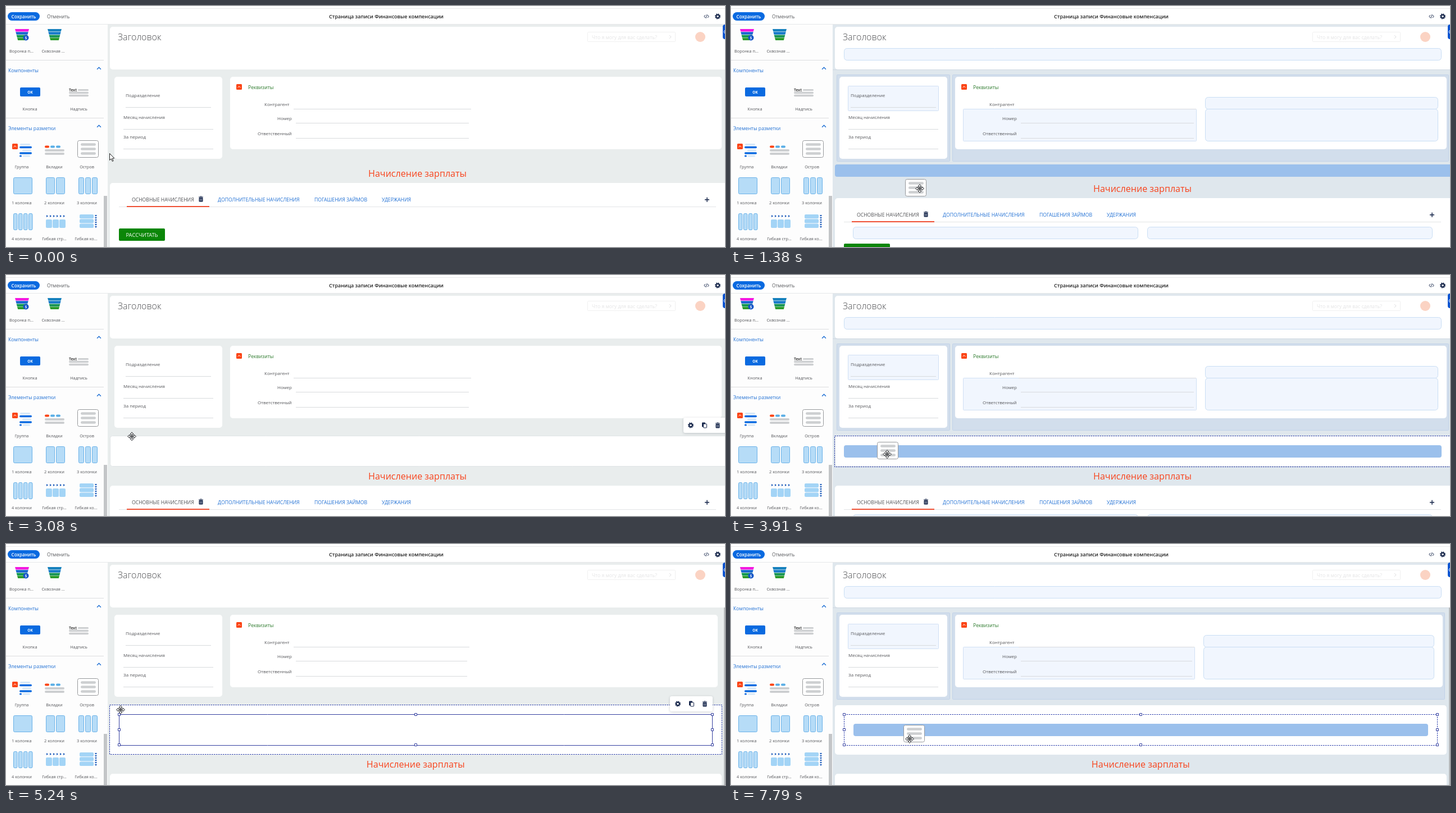
Recreate the animation shown at these times as an HTML page with a canvas. Size 1280x429 px, loop 8 s.

```html
<!DOCTYPE html>
<html lang="ru">
<head>
<meta charset="utf-8">
<title>Конструктор страницы</title>
<style>
html, body { margin: 0; width: 100%; height: 100%; overflow: hidden; background: #fff; }
canvas { display: block; width: 1280px; height: 429px; }
</style>
</head>
<body>
<canvas id="stage" width="1280" height="429"></canvas>
<script>
const c = document.getElementById('stage').getContext('2d', { alpha: false });
const LOOP = 8000, STEP = 77;
const BLUE = '#0a6ae0', LINK = '#2070d4', NAVY = '#3540a0', INK = '#16264a', RED = '#fb4415', GREY = '#cdcfd1';

// Pointer path: time, x, y
const PATH = [
  [60, 184, 262], [380, 152, 256], [600, 152, 256], [847, 305, 311], [1380, 336, 325],
  [2650, 336, 325], [3380, 146, 261], [3600, 146, 261], [3900, 278, 319],
  [4820, 278, 319], [5236, 204, 295], [5630, 161, 267], [5700, 159, 267],
  [5930, 157, 267], [6130, 157, 267], [6390, 138, 264], [7000, 138, 264],
  [7315, 235, 319], [7755, 318, 347]
];
// Each drag: grab, zones appear, drop, grab point inside the tile
const DRAGS = [
  { grab: 610, open: 760, drop: 1990, dx: 25, dy: 17 },
  { grab: 3620, open: 3760, drop: 4460, dx: 18, dy: 22 },
  { grab: 7010, open: 7400, drop: 8000, dx: 11, dy: 25 }
];
const TITLE_Y = [298, 325, 358, 358, 392, 392];

function pointer(t) {
  let a = PATH[0];
  if (t <= a[0]) return { x: a[1], y: a[2] };
  for (const b of PATH) {
    if (t < b[0]) {
      const k = (t - a[0]) / (b[0] - a[0]);
      return { x: a[1] + (b[1] - a[1]) * k, y: a[2] + (b[2] - a[2]) * k };
    }
    a = b;
  }
  return { x: a[1], y: a[2] };
}

const inside = (p, l, t, r, b) => p.x >= l && p.x <= r && p.y >= t && p.y <= b;

function fill(color, l, t, r, b) {
  c.fillStyle = color;
  c.fillRect(l, t, r - l, b - t);
}

function box(l, t, r, b, rad, color, edge) {
  c.beginPath();
  if (edge) c.roundRect(l + .5, t + .5, r - l - 1, b - t - 1, rad);
  else c.roundRect(l, t, r - l, b - t, rad);
  if (color) { c.fillStyle = color; c.fill(); }
  if (edge) { c.strokeStyle = edge; c.lineWidth = 1; c.stroke(); }
}

function text(s, x, y, size, color = '#55565a', align = 'left', weight = 400) {
  c.font = `${weight} ${size}px "Open Sans", "Noto Sans", sans-serif`;
  c.textAlign = align;
  c.textBaseline = 'alphabetic';
  c.fillStyle = color;
  c.fillText(s, x, y + size * .36 + .4);
}

function poly(points, color, edge, width = 1, close = true) {
  c.beginPath();
  points.forEach(([x, y], i) => i ? c.lineTo(x, y) : c.moveTo(x, y));
  if (close) c.closePath();
  if (color) { c.fillStyle = color; c.fill(); }
  if (edge) { c.strokeStyle = edge; c.lineWidth = width; c.stroke(); }
}

function disc(x, y, r, color) {
  c.beginPath();
  c.arc(x, y, r, 0, 7);
  c.fillStyle = color;
  c.fill();
}

const bar = (l, y, r, color = GREY, h = 4) => box(l, y - h / 2, r, y + h / 2, h / 2, color);
const chevron = (x, y, r, color, w) => poly([[x - r, y + r / 2], [x, y - r / 2], [x + r, y + r / 2]], null, color, w, false);
const zone = (l, t, r, b) => box(l, t, r, b, 5, '#f1f6fe', '#c9def4');
const area = (l, t, r, b) => box(l, t, r, b, 1, '#d2deec', '#c1d2e8');

function dashed(l, t, r, b) {
  c.setLineDash([2.5, 1.5]);
  box(l, t, r, b, 0, null, '#2639a8');
  c.setLineDash([]);
}

function collapse(x, y) {
  box(x - 5, y - 5, x + 5, y + 5, 1.5, RED);
  chevron(x, y, 2.4, '#fff', 1);
}

function gear(x, y) {
  c.strokeStyle = INK;
  c.lineWidth = 2;
  c.beginPath(); c.arc(x, y, 2.8, 0, 7); c.stroke();
  c.setLineDash([1.9, 1.4]);
  c.lineWidth = 1.6;
  c.beginPath(); c.arc(x, y, 4.2, 0, 7); c.stroke();
  c.setLineDash([]);
}

function trash(x, y) {
  box(x - 3.5, y - 2.5, x + 3.5, y + 5, 1, INK);
  fill(INK, x - 4, y - 4, x + 4, y - 3);
  fill(INK, x - 1.5, y - 5, x + 1.5, y - 4);
  fill('#b4bac7', x - 1.8, y - 1, x - .7, y + 3.5);
  fill('#b4bac7', x + .7, y - 1, x + 1.8, y + 3.5);
}

function toolbar(l, t, r, b, x) {
  c.shadowColor = 'rgba(40,50,70,.22)';
  c.shadowBlur = 4;
  c.shadowOffsetY = 1;
  box(l, t, r, b, 3, '#fff');
  c.shadowColor = 'transparent';
  c.shadowBlur = c.shadowOffsetY = 0;
  const y = (t + b) / 2;
  gear(x, y);
  box(x + 20, y - 5, x + 26, y + 3, 1, INK);
  box(x + 22, y - 3, x + 29, y + 5, 1, '#fff', INK);
  trash(x + 48, y);
}

function tile(x, y) {
  box(x, y, x + 38, y + 31, 3, '#fff', '#96989b');
  for (const d of [7.5, 15.5, 23.5]) bar(x + 6, y + d, x + 33, GREY, 4.4);
}

function funnel(x, y, colors) {
  const w = 12.5, h = 5.2;
  colors.forEach((color, i) => {
    const a = w - i * 1.3, b = a - 1.3, t = y + i * h;
    poly([[x - a, t], [x + a, t], [x + b, t + h - .7], [x - b, t + h - .7]], color);
  });
}

function columns(x, y, n, w, gap) {
  for (let i = 0; i < n; i++) box(x + i * (w + gap), y, x + i * (w + gap) + w, y + 30, 2, '#b6dcf7', '#69b1e8');
}

function heading(s, y) {
  text(s, 4, y, 8.67, LINK);
  chevron(165.5, y - 3, 3.4, LINK, 1.5);
}

function sidebar(hover) {
  fill('#fdfdfd', 0, 32, 181, 429);
  funnel(28.5, 41, ['#f316e0', '#1565cf', '#149a52', '#2a9b2b']);
  disc(35.5, 56.5, 5, '#1456c8');
  text('$', 35.5, 56, 7, '#fff', 'center', 600);
  funnel(86.5, 41, ['#1681bd', '#1479c8', '#1b9657', '#2a9b2b']);
  const label = (s, x, y) => text(s, x, y, 7.33, '#55565a', 'center');
  label('Воронка п...', 27.5, 79.5);
  label('Сквозная ...', 84, 79.5);
  fill('#dcdddf', 0, 96, 174, 97);
  heading('Компоненты', 114);

  box(25, 145, 61, 161, 2, BLUE);
  text('OK', 43, 153, 6.4, '#fff', 'center', 700);
  label('Кнопка', 42.5, 183);
  text('Text', 112, 149, 7, '#222', 'left', 600);
  bar(128, 149.5, 147, GREY, 3);
  bar(112, 154.5, 147, GREY, 3.4);
  bar(112, 159.5, 147, GREY, 3.4);
  label('Надпись', 129.5, 183);
  fill('#dcdddf', 0, 199, 174, 200);
  heading('Элементы разметки', 217);

  collapse(16, 250);
  bar(25, 246.5, 43, '#d7e8f7', 3);
  bar(24, 251.5, 46, BLUE, 3.4);
  bar(29, 257, 45, '#d7e8f7', 3);
  bar(24, 262, 46, BLUE, 3.4);
  bar(24, 267, 28, BLUE, 3);
  bar(30, 267, 43, '#d7e8f7', 3);
  bar(69, 250.5, 77, RED);
  bar(79, 250.5, 87, '#59aee6');
  bar(89, 250.5, 97, '#59aee6');
  bar(69, 257, 104);
  bar(69, 263, 104);
  if (hover) box(118, 235, 172, 293, 3, '#fcfcfc', '#f1f1f2');
  tile(127, 239);
  ['Группа', 'Вкладки', 'Остров'].forEach((s, i) => label(s, 28 + i * 58, 286));

  columns(13, 305, 1, 34, 0);
  columns(71, 305, 2, 16, 2);
  columns(129, 305, 3, 10, 2);
  ['1 колонка', '2 колонки', '3 колонки'].forEach((s, i) => label(s, 28 + i * 58, 350));
  columns(13, 369, 4, 7.5, 1.5);
  for (let i = 0; i < 6; i++) {
    const x = 72 + i * 6, y = 373 + i * 4;
    poly([[x, 372], [x + 3, 374], [x, 376]], '#1556b8');
    poly([[158, y - 1], [162, y - 1], [160, y + 2]], '#1556b8');
  }
  for (let i = 0; i < 3; i++) {
    box(71 + i * 12, 380, 82 + i * 12, 395, 2, '#a3d4f6');
    box(131, 371 + i * 8.3, 156, 378.3 + i * 8.3, 2, '#a3d4f6');
  }
  label('4 колонки', 28, 414);
  label('Гибкая стр...', 86, 414);
  label('Гибкая ко...', 142.5, 414);
  fill('#c3c5c7', 174, 338, 180, 429);
}

function header() {
  fill('#fff', 0, 0, 1280, 32);
  fill('#e9eaeb', 0, 4, 1280, 5);
  fill('#e6e8e9', 0, 32, 1280, 33);
  box(3, 11, 60, 26, 7.5, BLUE);
  text('Сохранить', 31.5, 18.5, 8.1, '#fff', 'center', 600);
  text('Отменить', 73, 18.5, 8.3);
  text('Страница записи Финансовые компенсации', 677, 18.5, 9, '#222', 'center', 600);
  poly([[1245, 16], [1243, 18.5], [1245, 21]], null, INK, 1, false);
  poly([[1249, 16], [1251, 18.5], [1249, 21]], null, INK, 1, false);
  poly([[1248, 15], [1246, 22]], null, INK, .9, false);
  gear(1267, 18.5);
}

function topCard() {
  box(185, 37, 1290, 113, 5, '#fff');
  text('Заголовок', 199, 55, 16, '#4d4e51', 'left', 300);
  box(1035, 46, 1192, 64, 1, '#fff', '#f0f0f0');
  text('Что я могу для вас сделать?', 1043, 55.5, 8.67, '#e4e4e5');
  poly([[1181, 52], [1184, 55], [1181, 58]], null, '#dededf', 1, false);
  disc(1236, 55, 9, '#fbd3c3');
  box(1276, 33, 1286, 59, 4, '#0c55d2');
  poly([[1280, 43], [1278, 46], [1280, 49]], null, '#fff', 1, false);
}

const rule = (l, r, y) => fill('#d8dadd', l, y, r, y + 1);

function fieldCards(narrow, drag, zones) {
  const cut = narrow ? 7 : 0, half = cut / 2 | 0;
  if (drag) {
    area(188, 122, 390, 277);
    area(394, 122, 1278 - cut, 277);
  }
  box(193, 126, 385, 272, 5, '#fff');
  box(399, 126, 1274 - cut, 255, 5, '#fff');
  if (drag) {
    box(208, 142, 370, 187, 1, '#f1f6fe', '#d0e0f4');
    box(413, 183, 829 - half, 241, 1, '#f1f6fe', '#d0e0f4');
  }
  text('Подразделение', 213, 159, 8);
  text('Месяц начисления', 209, 198, 8);
  text('За период', 209, 233, 8);
  rule(213, 365, 180);
  rule(209, 369, 219);
  rule(209, 369, 254);

  collapse(415, 144);
  text('Реквизиты', 431, 144.5, 8.67, '#2c7a2c');
  text('Контрагент', 460, 174.5, 8);
  text('Номер', 483, 200, 8);
  text('Ответственный', 448, 227, 8);
  rule(512, 828 - half, 183);
  rule(516, 824 - half, 208);
  rule(516, 824 - half, 235);

  c.globalAlpha = zones;
  zone(844 - half, 162, 1259 - cut, 184);
  zone(844 - half, 183, 1259 - cut, 241);
  zone(201, 75, 1265, 97);
  c.globalAlpha = 1;
}

function tabsCard(y, narrow, zones) {
  text('Начисление зарплаты', narrow ? 729.3 : 732.5, y, 16.1, '#f8431c', 'center');
  box(185, y + 17, narrow ? 1274 : 1290, y + 160, 5, '#fff');
  const ty = y + 46;
  text('ОСНОВНЫЕ НАЧИСЛЕНИЯ', 224, ty, 8.67, '#505154');
  text('ДОПОЛНИТЕЛЬНЫЕ НАЧИСЛЕНИЯ', 377, ty, 8.67, LINK);
  text('ПОГАШЕНИЯ ЗАЙМОВ', 549, ty, 8.67, LINK);
  text('УДЕРЖАНИЯ', 669, ty, 8.67, LINK);
  trash(347, ty - .5);
  fill(INK, 1244, ty, 1252, ty + 1.5);
  fill(INK, 1247.3, ty - 3.3, 1248.8, ty + 4.8);
  fill('#e2e4e6', 201, y + 59, 1264, y + 60);
  fill('#ee5034', 215, y + 58, 362, y + 60);
  c.globalAlpha = zones;
  zone(217, y + 68, 725, y + 90);
  zone(741, y + 68, 1249, y + 90);
  c.globalAlpha = 1;
  box(201, y + 98, 283, y + 120, 2, '#0b8608');
  text('РАССЧИТАТЬ', 242, y + 109, 9.33, '#fff', 'center');
}

function islands(state, t, p) {
  const hot = '#9bc0ec';
  if (state === 1) {
    if (t < 1000) {
      box(188, 282, 390, 304, 4, hot, '#8fb5e3');
      box(394, 282, 1278, 304, 4, '#d2deec', '#bfd1e8');
    } else {
      box(185, 282, 1290, 304, 4, hot);
    }
  }
  if (state === 2 || state === 3) {
    box(185, 286, 1290, 341, 4, '#fff', '#e0e4e6');
    if (state === 3) {
      dashed(184, 286, 1290, 342);
      box(201, 303, 1265, 325, 4, hot);
    } else {
      toolbar(1206, 254, 1290, 281, 1219);
    }
  }
  if (state < 4) return;
  box(185, 287, 1274, 375, 5, '#fff');
  const over = inside(p, 185, 287, 1275, 375) && !inside(p, 201, 303, 1258, 358);
  if (state === 4 && t < 7010 && over) dashed(184, 286, 1275, 375);
  if (state === 5) {
    dashed(201, 303, 1258, 359);
    box(218, 320, 1241, 342, 4, hot);
  } else {
    box(201, 303, 1258, 359, 0, null, NAVY);
  }
  for (const x of [201.5, 729.5, 1257.5])
    for (const y of [303.5, 330.5, 357.5])
      if (x !== 729.5 || y !== 330.5) box(x - 2.5, y - 2.5, x + 2.5, y + 2.5, 0, '#fff', NAVY);
  if (state === 4) toolbar(1182, 271, 1258, 298, 1196);
}

function arrow(x, y) {
  const shape = [[0, 0], [0, 12], [2.8, 9.4], [4.8, 14], [6.6, 13.2], [4.7, 8.8], [8.2, 8.5]];
  poly(shape.map(([a, b]) => [x + a, y + b]), '#fff', '#222', 1);
}

function moveMark(x, y) {
  c.save();
  c.translate(x, y);
  for (let i = 0; i < 4; i++) {
    poly([[-1, -1], [-1, -4], [-3, -4], [0, -7.5], [3, -4], [1, -4], [1, -1]], '#fff', '#26282c', 1);
    c.rotate(Math.PI / 2);
  }
  fill('#fff', -1, -1, 1, 1);
  disc(0, 0, 1, '#26282c');
  c.restore();
}

function draw(t) {
  const q = Math.floor((t + 20) / STEP) * STEP;
  const p = pointer(q);
  const state = DRAGS.reduce((n, d) => n + (t >= d.open) + (t >= d.drop), 0);
  const drag = state % 2 === 1, narrow = state >= 4;
  const done = DRAGS.filter(d => t >= d.drop).pop();
  const fade = done ? Math.max(0, 1 - (t - done.drop) / 240) : 0;
  const zones = drag ? 1 : fade;
  const held = DRAGS.find(d => t >= d.grab && t < d.drop);

  fill(drag ? '#dfe7ed' : '#e9eded', 0, 0, 1280, 429);
  topCard();
  if (drag) fill('#cfd8e2', 181, 113, 1280, 114);
  fieldCards(narrow, drag, zones);
  tabsCard(TITLE_Y[state], narrow, zones);
  islands(state, t, p);
  if (narrow) fill('#b9bcbe', 1278, 113, 1280, 429);
  sidebar(t >= 7010 && t < 7400);
  header();

  if (held) {
    const g = pointer(Math.max(held.grab - 10, q - (t < held.open ? 215 : 20)));
    tile(Math.round(g.x - held.dx), Math.round(g.y - held.dy));
  }
  if (t < 300) arrow(p.x + .5, p.y + .5);
  else moveMark(p.x, p.y);
}

const start = performance.now();
function frame() {
  draw((performance.now() - start) % LOOP);
  requestAnimationFrame(frame);
}
frame();
</script>
</body>
</html>
```
